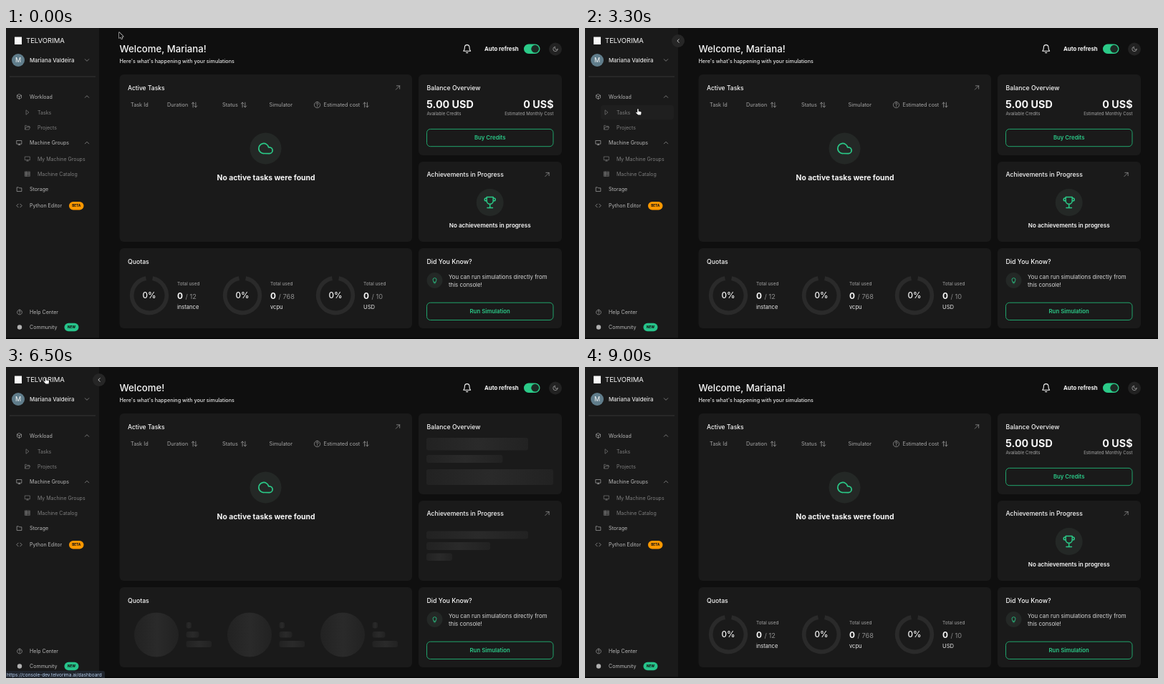
Animation of 800x435 px, one loop 9.1 s. Source, as an HTML page with a canvas:

```html
<!DOCTYPE html>
<html lang="en">
<head>
<meta charset="utf-8">
<title>Console dashboard</title>
<style>
html, body { margin: 0; width: 100%; height: 100%; overflow: hidden; background: #0f0f0f; }
canvas { display: block; width: 800px; height: 435px; }
</style>
</head>
<body>
<canvas id="stage"></canvas>
<script>
const W = 800, H = 435, LOOP = 9100, STEP = 100;
const GREEN = '#2bca88', EDGE = '#20a46c', CARD = '#1a1a1a', WHITE = '#f8f8f8', GREY = '#a5a5a5';
const BRAND = 'Telvorima', USER = 'Mariana Valdeira';

// times of the hard changes, in ms
const OPEN_TASKS = 3600, OPEN_HOME = 6200, LOADED = 6900;
const LINK_ON = 5600, LINK_OFF = 8600, LEAVE = 8300;

const canvas = document.getElementById('stage');
const ctx = canvas.getContext('2d');
const ratio = window.devicePixelRatio || 1;
canvas.width = W * ratio;
canvas.height = H * ratio;

const ICON = {
  cube: 'M12 2l9 5v10l-9 5-9-5V7zM3 7l9 5 9-5M12 12v10',
  play: 'M7 3l11 9-11 9z',
  folder: 'M2 20V4h7l3 3h10v13z',
  openFolder: 'M2 20V4h6l3 3h9v4M2 20l4-9h17l-4 9z',
  monitor: 'M2 3h20v14H2zM8 21h8M12 17v4',
  rows: 'M2 3h20v5H2zM2 10h20v5H2zM2 17h20v5H2zM7 3v19',
  code: 'M8 5l-7 7 7 7M16 5l7 7-7 7',
  up: 'M4 16l8-8 8 8',
  down: 'M4 8l8 8 8-8',
  left: 'M16 4l-8 8 8 8',
  right: 'M8 4l8 8-8 8',
  first: 'M11 4l-8 8 8 8M21 4l-8 8 8 8',
  last: 'M3 4l8 8-8 8M13 4l8 8-8 8',
  open: 'M4 20L20 4M7 4h13v13',
  sort: 'M7 21V3M2 8l5-5 5 5M17 3v18M12 16l5 5 5-5',
  help: 'M12 1a11 11 0 1 0 .01 0M8.8 9a3.3 3.3 0 1 1 4.6 3c-1.4.8-1.4 1.3-1.4 2.4M12 17.5v.6',
  bell: 'M18 8A6 6 0 0 0 6 8c0 7-3 10-3 10h18s-3-3-3-10M14 21.5a2.3 2.3 0 0 1-4 0',
  moon: 'M21 12.8A9 9 0 1 1 11.2 3 7 7 0 0 0 21 12.8z',
  cloud: 'M18 10h-1.3A8 8 0 1 0 9 20h9a5 5 0 0 0 0-10z',
  trophy: 'M6 9H4.5a2.5 2.5 0 0 1 0-5H6M18 9h1.5a2.5 2.5 0 0 0 0-5H18M7 22h10M12 15v7M6 2h12v7a6 6 0 0 1-12 0z',
  bulb: 'M9 18h6M10 21.5h4M9 18c0-3-3-4-3-8a6 6 0 0 1 12 0c0 4-3 5-3 8',
  filter: 'M22 3H2l8 9.5V19l4 2v-8.5z',
  search: 'M10.5 2a8.5 8.5 0 1 0 .01 0M17 17l6 6',
  wrench: 'M14.7 6.3a1 1 0 0 0 0 1.4l1.6 1.6a1 1 0 0 0 1.4 0l3.8-3.8a6 6 0 0 1-8 8l-6.9 6.9a2.1 2.1 0 0 1-3-3l6.9-6.9a6 6 0 0 1 8-8z',
  arrow: 'M0 0v9.6l2.2-2 1.5 3.4 1.7-.8-1.5-3.2h3z',
  hand: 'M2.5 1c0-1.4 1.8-1.4 1.8 0v3l3.4.8c1 .3 1.3.9 1.2 1.8L8.3 10H3.6L.4 6.8c-.7-1 .5-1.8 1.3-1l.8.7z'
};
for (const k in ICON) ICON[k] = new Path2D(ICON[k]);

// text is placed by the middle of its capitals
function text(s, x, y, size, color = WHITE, weight = 400, align = 'left') {
  ctx.font = `${weight} ${size}px Inter, "Open Sans", sans-serif`;
  ctx.textAlign = align;
  ctx.fillStyle = color;
  ctx.fillText(s, x, y + size * 0.36);
}

function box(x, y, w, h, r, fill, stroke) {
  ctx.beginPath();
  ctx.roundRect(x, y, w, h, r);
  if (fill) { ctx.fillStyle = fill; ctx.fill(); }
  if (stroke) { ctx.strokeStyle = stroke; ctx.lineWidth = 1; ctx.stroke(); }
}

function disc(x, y, r, fill) {
  ctx.beginPath();
  ctx.arc(x, y, r, 0, Math.PI * 2);
  ctx.fillStyle = fill;
  ctx.fill();
}

function rule(x, y, w, color = '#262626') {
  ctx.fillStyle = color;
  ctx.fillRect(x, y, w, 1);
}

function icon(name, x, y, size, color = GREY, weight = 2) {
  ctx.save();
  ctx.translate(x, y);
  ctx.scale(size / 24, size / 24);
  ctx.translate(-12, -12);
  ctx.strokeStyle = color;
  ctx.lineWidth = weight;
  ctx.lineCap = ctx.lineJoin = 'round';
  ctx.stroke(ICON[name]);
  ctx.restore();
}

function badge(s, x, y, w, color) {
  box(x, y, w, 11.5, 5.75, color);
  text(s, x + w / 2, y + 5.8, 4.6, '#151515', 800, 'center');
}

function button(s, y) {
  box(587.5, y, 176.5, 24.3, 5, null, EDGE);
  text(s, 675.7, y + 12, 7.8, GREEN, 600, 'center');
}

function emblem(name, x, y, r, size) {
  disc(x, y, r, '#242826');
  icon(name, x, y, size, GREEN, 2);
}

function sidebar(s) {
  box(0, 0, 130, H, 0, CARD);
  box(12, 12.5, 10, 10.5, 0, WHITE);
  text(BRAND.toUpperCase(), 28, 18, 9.5, WHITE, 400);
  disc(17, 45, 9, '#607d8b');
  text(USER[0], 17, 45, 9, WHITE, 400, 'center');
  text(USER, 33, 45, 7.8, '#e4e4e4', 500);
  icon('down', 113, 45, 8);
  rule(5, 67.5, 120, '#363636');

  if (s.tasks) box(6, 85, 118, 21, 4, '#222222');
  if (s.hover) box(22, 108, 102, 20, 4, '#1f1f1f');

  const main = [['cube', 'Workload', 96], ['monitor', 'Machine Groups', 160.5],
    ['folder', 'Storage', 225.5], ['code', 'Python Editor', 248.5]];
  for (const [ic, label, y] of main) {
    icon(ic, 18.5, y, 8, '#b0b0b0');
    text(label, 33, y, 7.1, '#b8b8b8');
  }
  icon('up', 113, 96, 8);
  icon('up', 113, 160.5, 8);

  const sub = [['play', 'Tasks', 118], ['openFolder', 'Projects', 139],
    ['monitor', 'My Machine Groups', 183], ['rows', 'Machine Catalog', 204]];
  for (const [ic, label, y] of sub) {
    const lit = s.tasks && label === 'Tasks';
    icon(ic, 30, y, 8, lit ? '#c8c8c8' : '#7d7d7d');
    text(label, 44, y, 7, lit ? '#dedede' : '#7d7d7d');
  }
  badge('BETA', 88, 243, 20.5, '#ff9800');

  icon('help', 19, 397.5, 7.5, '#b0b0b0');
  text('Help Center', 33, 397.5, 7.1, '#b8b8b8');
  disc(19, 418.5, 3.2, '#b0b0b0');
  text('Community', 33, 418.5, 7.1, '#b8b8b8');
  badge('NEW', 81.5, 412.7, 20, '#27c38a');
}

function topBar(title, dx) {
  text(title, 158.5, 29.5, 13.2, WHITE, 500);
  icon('bell', 643.7 + dx, 29, 13, WHITE, 2);
  text('Auto refresh', 668 + dx, 29.5, 7.8, WHITE, 700);
  box(723 + dx, 22.5, 22.5, 13.5, 6.75, GREEN);
  disc(738.7 + dx, 29.2, 5.4, '#1d2a24');
  disc(767 + dx, 29.5, 9, '#222222');
  icon('moon', 767 + dx, 29.5, 8.5, '#b5b5b5');
}

function heads(list, y) {
  for (const [label, x, sortX] of list) {
    text(label, x, y, 7.3, GREY);
    if (sortX) icon('sort', sortX, y, 9, GREY);
    if (label === 'Estimated cost') icon('help', x - 9, y, 9, GREY);
  }
}

function gauge(x, max, unit) {
  ctx.beginPath();
  ctx.arc(x, 374, 24.3, -1.38, -1.76 + Math.PI * 2);
  ctx.strokeStyle = '#2a2a2a';
  ctx.lineWidth = 5.7;
  ctx.lineCap = 'butt';
  ctx.stroke();
  text('0%', x, 374, 11.6, WHITE, 500, 'center');
  text('Total used', x + 39, 357.5, 6.4, GREY);
  text('0', x + 39, 375, 11.8, WHITE, 700);
  text('/ ' + max, x + 50.5, 375.5, 9.2, '#8c8c8c');
  text(unit, x + 39, 390, 7.6, '#e8e8e8');
}

function shimmer(x, w, t) {
  const g = ctx.createLinearGradient(x, 0, x + w, 0);
  const mid = 0.15 + 0.7 * (((t - OPEN_HOME) / 1400 + 0.3) % 1);
  g.addColorStop(0, '#222222');
  g.addColorStop(mid, '#2a2a2a');
  g.addColorStop(1, '#222222');
  return g;
}

function bone(x, y, w, h, t) {
  box(x, y, w, h, Math.min(3, h / 2), shimmer(x, w, t));
}

function dashboard(s, t) {
  topBar(s.loading ? 'Welcome!' : `Welcome, ${USER.split(' ')[0]}!`, 0);
  text("Here's what's happening with your simulations", 158.5, 46, 7.2, '#e6e6e6', 500);

  for (const [y, h] of [[65, 113], [187, 112], [308, 112]]) box(576, y, 200, h, 6, CARD);
  box(158.5, 65, 408.5, 234, 6, CARD);
  box(158.5, 308, 408.5, 112, 6, CARD);

  text('Active Tasks', 170, 83.5, 8.5, WHITE, 500);
  icon('open', 547, 83.5, 8);
  heads([['Task Id', 174], ['Duration', 225, 263], ['Status', 302, 332],
    ['Simulator', 367.5], ['Estimated cost', 443.5, 502.5]], 107.5);
  emblem('cloud', 362.5, 168.5, 22, 21);
  text('No active tasks were found', 363, 209.5, 10.35, WHITE, 700, 'center');

  text('Balance Overview', 587.5, 83.5, 8.7, WHITE, 500);
  text('Achievements in Progress', 587.5, 205, 8.65, WHITE, 500);
  icon('open', 755.5, 205, 8);
  text('Quotas', 170, 326.5, 8.7, WHITE, 500);

  if (s.loading) {
    bone(587, 99, 142, 17.5, t);
    bone(587, 123, 106.5, 11, t);
    bone(587, 143, 177, 22, t);
    bone(587, 229.5, 142, 11, t);
    bone(587, 245, 89, 11, t);
    bone(587, 260.5, 36, 10.5, t);
    for (let i = 0; i < 3; i++) {
      const x = 210 + i * 130;
      disc(x, 374.5, 31, shimmer(x - 31, 62, t));
      bone(x + 41.5, 357, 7.5, 8.5, t);
      bone(x + 41.5, 370, 18, 8.5, t);
      bone(x + 41.5, 383, 35.5, 9, t);
    }
  } else {
    text('5.00 USD', 587, 106.5, 14.3, WHITE, 700);
    text('0 US$', 764.5, 106.5, 14.3, WHITE, 700, 'right');
    text('Available Credits', 587.5, 120, 6.1, GREY);
    text('Estimated Monthly Cost', 764.5, 120, 6.1, GREY, 400, 'right');
    button('Buy Credits', 141.4);
    emblem('trophy', 675.7, 244, 19, 18);
    text('No achievements in progress', 675.7, 276.5, 8.1, WHITE, 600, 'center');
    gauge(200, 12, 'instance');
    gauge(330, 768, 'vcpu');
    gauge(460, 10, 'USD');
  }

  text('Did You Know?', 587.5, 326.5, 8.8, WHITE, 500);
  emblem('bulb', 598.5, 353, 11, 10);
  text('You can run simulations directly from', 618, 348, 7.85, '#d8d8d8');
  text('this console!', 618, 359.5, 7.85, '#d8d8d8');
  button('Run Simulation', 384.2);
}

function select(label, x, y, w) {
  box(x, y, w, 20, 3, '#232323');
  text(label, x + 6.5, y + 10, 7.1, GREY);
  icon('down', x + w - 11, y + 10, 10, '#b5b5b5');
}

function tasksPage() {
  topBar('Simulation Tasks', 2.6);
  box(158.5, 53, 48, 20.5, 4, '#202020');
  icon('filter', 168.5, 63.3, 8.5, WHITE);
  text('Filters', 177, 63.3, 7.7, WHITE, 600);

  box(158.5, 82, 620.5, 74.5, 6, CARD);
  text('Project', 172, 100.5, 7.5, WHITE, 500);
  text('Status', 292, 100.5, 7.5, WHITE, 500);
  select('Select projects', 171.5, 110, 111.5);
  select('Select statuses', 292, 110, 112);

  box(158.5, 165, 220.5, 20, 3, '#232323');
  icon('search', 169.5, 175, 9, '#b5b5b5');
  text('Search by task ID...', 180.5, 175, 7.2, GREY);

  heads([['Task Id', 167], ['Status', 224], ['Submit time', 277, 326],
    ['Start time', 372, 414], ['Duration', 458, 495.5], ['Simulator', 537.5],
    ['Project', 605], ['Estimated cost', 673, 733]], 206);
  rule(158.5, 218, 620.5);
  emblem('wrench', 468.3, 273.5, 22, 22);
  text('No tasks were found', 468.5, 314.5, 10.3, WHITE, 700, 'center');

  rule(158.5, 357, 620.5);
  select('20', 568.5, 363, 43.5);
  const pager = [['first', 625], ['left', 649], ['right', 734], ['last', 759]];
  for (const [name, x] of pager) icon(name, x, 373, 8, '#8c8c8c');
  text('0 - 0 of 0 records', 662.5, 373, 7.1, '#cfcfcf');
  rule(158.5, 388, 620.5);

  rule(130, 412, 670);
  text(`© 2025 ${BRAND} Research Labs, SA. All rights reserved.`, 138, 420.5, 5.9, '#767676');
  text(`${BRAND}.AI® is a registered trademark of ${BRAND} Research Labs, SA. ` +
    'All other trademarks mentioned are the property of their respective owners.',
    138, 429, 4.75, '#454545');
  ctx.fillStyle = '#303030';
  ctx.fillRect(758, 419, 1, 11);
  text('EULA', 771.5, 424.5, 6.1, '#767676');
}

// pointer stops: time, x, y
const PATH = [[0, 158, 6], [2000, 158, 6], [2800, 71, 113], [4500, 71, 113],
  [5400, 52.5, 15], [7500, 52.5, 15], [7900, 58, 14], [LOOP, 58, 14]];

function pointer(t) {
  const i = PATH.findIndex((p, k) => k > 0 && t <= p[0]);
  const [t0, x0, y0] = PATH[i - 1], [t1, x1, y1] = PATH[i];
  const u = (t - t0) / (t1 - t0), e = u * u * (3 - 2 * u);
  return { x: x0 + (x1 - x0) * e, y: y0 + (y1 - y0) * e };
}

function drawPointer(p, hand) {
  ctx.save();
  ctx.translate(p.x, p.y);
  ctx.scale(0.85, 0.85);
  ctx.lineJoin = 'round';
  ctx.lineWidth = 1.3;
  ctx.strokeStyle = hand ? '#111111' : '#f0f0f0';
  ctx.fillStyle = hand ? '#f5f5f5' : '#050505';
  const shape = hand ? ICON.hand : ICON.arrow;
  ctx.stroke(shape);
  ctx.fill(shape);
  ctx.restore();
}

function draw(t) {
  const p = pointer(t), present = t < LEAVE;
  const inside = present && p.x < 130;
  const overTasks = inside && p.y > 108 && p.y < 128;
  const state = {
    tasks: t >= OPEN_TASKS && t < OPEN_HOME,
    loading: t >= OPEN_HOME && t < LOADED,
    hover: overTasks
  };
  ctx.setTransform(ratio, 0, 0, ratio, 0, 0);
  box(0, 0, W, H, 0, '#0f0f0f');
  sidebar(state);
  if (state.tasks) tasksPage();
  else dashboard(state, t);
  ctx.fillStyle = '#050505';
  ctx.fillRect(0, 433.5, W, 1.5);

  if (inside) {
    disc(130, 18, 9, '#262626');
    icon('left', 130, 18, 7, WHITE, 2.6);
  }
  if (t >= LINK_ON && t < LINK_OFF) {
    box(0, 425, 138, 10, [0, 3, 0, 0], '#20252d');
    text(`https://console-dev.${BRAND.toLowerCase()}.ai/dashboard`, 1, 430.3, 6.5, '#b9d2f2');
  }
  if (present) drawPointer(p, overTasks || (inside && p.y < 26));
}

function frame() {
  const t = performance.now() % LOOP;
  draw(Math.floor(t / STEP) * STEP);
  requestAnimationFrame(frame);
}
frame();
</script>
</body>
</html>
```
